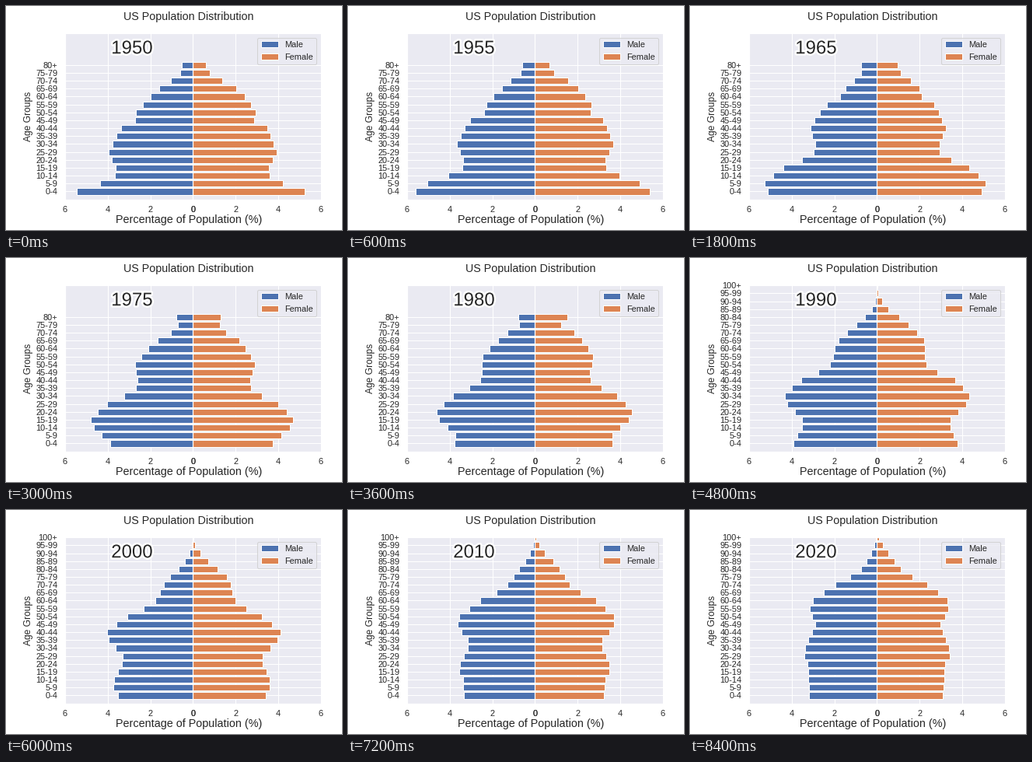
A matplotlib script for the animation above (9 s loop, 432 by 288 pixels).

```python
import matplotlib.pyplot as plt
import numpy as np
from matplotlib.animation import FuncAnimation
from matplotlib.patches import Patch
from matplotlib.patheffects import withStroke

W, H = 432, 288
BLUE, ORANGE, INK = "#4C72B0", "#DD8452", "0.15"

plt.rcParams.update({
    "font.family": "Liberation Sans", "font.size": 12,
    "text.color": INK, "axes.labelcolor": INK,
    "xtick.color": INK, "ytick.color": INK,
    "axes.facecolor": "#EAEAF2", "axes.edgecolor": "white",
    "axes.linewidth": 1.25, "axes.grid": True, "axes.axisbelow": True,
    "grid.color": "white", "grid.linewidth": 1,
    "axes.labelsize": 12, "xtick.labelsize": 11, "ytick.labelsize": 11,
    "xtick.major.size": 6, "ytick.major.size": 6, "xtick.major.pad": 2,
    "xtick.bottom": False, "ytick.left": False,
    "legend.fontsize": 11,
})

# Turning points of the birth curve: year, boys aged 0-4 in millions
BIRTHS = np.array([
    (1860, 1.8), (1870, 2.4), (1885, 4.3), (1900, 4.85), (1905, 4.65),
    (1910, 5.6), (1925, 6.4), (1935, 5.85), (1940, 5.93), (1945, 7.05),
    (1950, 8.8), (1955, 9.75), (1960, 10.5), (1965, 10.2), (1975, 8.5),
    (1980, 8.55), (1990, 9.95), (1995, 10.3), (2000, 10.0), (2020, 10.8),
])
AGE = np.arange(25)  # five-year age groups


def population(year):
    """Men and women per age group: births, arrivals, then survival."""
    born = year - 5 * AGE
    age_1980 = np.maximum(0, (1980 - born) / 5)
    arrivals = np.maximum(0, np.minimum(AGE, 8) - age_1980)
    cohort = np.interp(born, *BIRTHS.T) * np.exp(0.024 * arrivals)

    span_m = np.maximum(14.7, 14.7 + 0.046 * (born - 1900))
    span_f = np.maximum(15.3, 16.2 + 0.043 * (born - 1900))
    ratio = 0.962 * (1 + 0.006 * np.minimum(AGE, 8))
    men = cohort * np.exp(-(AGE / span_m) ** 5.5)
    women = cohort * ratio * np.exp(-(AGE / span_f) ** 7)
    return men, women


def shares(year, n):
    """Percent of the total per group; the last of n groups is open-ended."""
    men, women = population(year)
    total = men.sum() + women.sum()
    return [100 * np.append(p[:n - 1], p[n - 1:].sum()) / total
            for p in (men, women)]


def age_labels(n):
    return [f"{5 * a}-{5 * a + 4}" for a in range(n - 1)] + [f"{5 * n - 5}+"]


fig = plt.figure(figsize=(W / 72, H / 72), dpi=72, facecolor="white")


def panel(x):
    return fig.add_axes([x / W, 39.4 / H, 164.5 / W, 213.4 / H])


def caption(x, y, text, size, **kw):
    return fig.text(x / W, y / H, text, size=size, ha="center", **kw)


left, right = panel(76), panel(240.5)
caption(234.3, 270.2, "US Population Distribution", 14.2)
caption(235, 9, "Percentage of Population (%)", 14.4)
year_text = caption(162, 226.8, "", 24, path_effects=[
    withStroke(linewidth=5, foreground="white")])


def draw_side(ax, vals, color, xlim):
    ax.clear()
    ax.barh(range(len(vals)), vals, height=0.8, color=color,
            edgecolor="white", linewidth=1)
    ax.set(xlim=xlim, ylim=(-1, 20), xticks=[0, 2, 4, 6],
           yticks=range(len(vals)))


def draw(k):
    year = 1950 + 5 * k
    n = 17 if year < 1990 else 21
    men, women = shares(year, n)
    draw_side(left, men, BLUE, (6, 0))
    draw_side(right, women, ORANGE, (0, 6))
    left.set_yticklabels(age_labels(n))
    left.set_ylabel("Age Groups", labelpad=3)
    right.set_yticklabels([])
    keys = [Patch(facecolor=c, edgecolor="white", label=s)
            for c, s in ((BLUE, "Male"), (ORANGE, "Female"))]
    right.legend(handles=keys, loc="upper right")
    year_text.set_text(str(year))
    return []


anim = FuncAnimation(fig, draw, frames=15, init_func=lambda: draw(0),
                     interval=600, repeat=True, repeat_delay=0, blit=False)
plt.show()
```
